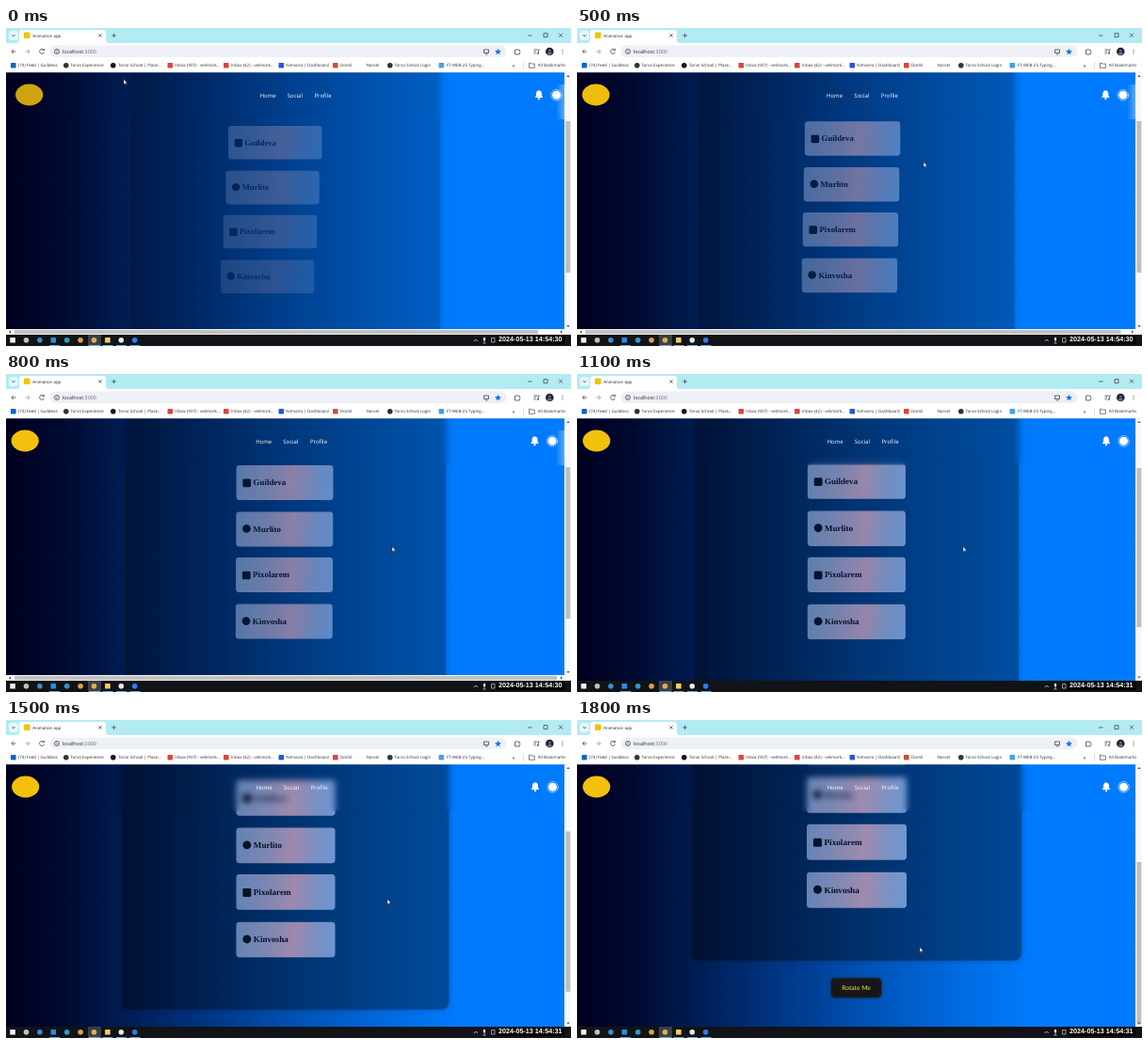
Write an HTML page that moves like this. It is 600 by 338 pixels and loops after 1900 ms.

```html
<!DOCTYPE html>
<html lang="en">
<head>
<meta charset="utf-8">
<title>Animation app</title>
<style>
  html, body { margin: 0; width: 600px; height: 338px; overflow: hidden; }
  body { position: relative; font-family: "Open Sans", sans-serif; text-rendering: geometricPrecision; }
  svg { position: absolute; left: 0; top: 0; overflow: visible; }
  svg text { white-space: pre; }

  #page {
    position: absolute; inset: 0; overflow: hidden;
    background: linear-gradient(90deg, #000020 0, #000a30 60px, #001c52 125px, #00317c 200px,
      #0050b2 300px, #0069de 400px, #007afc 480px, #007bff 600px);
  }
  #panel {
    position: absolute; left: 122px; top: -300px; width: 350px; height: 546px;
    border-radius: 8px;
    background: rgba(0, 0, 0, var(--shade));
    box-shadow: 0 0 5px rgba(0, 0, 0, calc(var(--shade) * .7));
    transform-origin: 175px 300px;
    transform: translateY(calc(var(--top) * 1px)) scale(var(--scale));
  }
  .card {
    position: absolute; left: 122px; top: calc(300px + 50.6px * var(--i));
    width: 106px; height: 38px; border-radius: 3.5px;
    background: linear-gradient(97deg, #6484b6, #8088b2 32%, #a08bae 58%, #7a92c4 80%, #6f98d4);
    color: #06132b; font: bold 9.2px/38px "Liberation Serif", serif;
    opacity: calc(1 - var(--fade) * (1 + .1 * var(--i)));
    transform: translateX(calc(var(--lag) * -1px * (1 + .24 * var(--i))));
  }
  .card i {
    position: absolute; left: 6.5px; top: 14.5px; width: 9px; height: 9px;
    background: #06132b; border-radius: 1.5px;
  }
  .card i.dot { border-radius: 50%; }
  .card span { position: absolute; left: 18.5px; top: 0; }
  #rotate {
    position: absolute; left: 270px; top: 265.2px; width: 53px; height: 20px;
    border-radius: 4px; background: #17171b; color: #f2e53c;
    box-shadow: 0 0 2px 1px rgba(40, 28, 30, .75);
    font: 6.7px/20px Lato, sans-serif; text-align: center;
    transform: translateY(calc(var(--top) * 1px));
  }
  #head {
    position: absolute; left: 0; top: 47px; width: 593px; height: 50px;
    -webkit-backdrop-filter: blur(3px); backdrop-filter: blur(3px);
  }
  #glow {
    position: absolute; left: 584px; top: 60px; width: 9px; height: 37px;
    background: linear-gradient(90deg, rgba(255,255,255,0), rgba(255,255,255,.35));
  }
  #nav { transform: translateX(calc(var(--shift) * 1px)); }
  #cursor { transform: translate(calc(var(--cx) * 1px), calc(var(--cy) * 1px)); }
  .early #late, .late #early, .late #glow { display: none; }
</style>
</head>
<body>
<div id="page">
  <div id="panel">
    <div class="card" style="--i:0"><i></i><span>Guildeva</span></div>
    <div class="card" style="--i:1"><i class="dot"></i><span>Murlito</span></div>
    <div class="card" style="--i:2"><i></i><span>Pixolarem</span></div>
    <div class="card" style="--i:3"><i class="dot"></i><span>Kinvosha</span></div>
  </div>
  <div id="rotate">Rotate Me</div>
  <div id="head"></div>
  <div id="glow"></div>
  <svg width="600" height="338">
    <g id="nav" fill="#fff" font-size="6">
      <ellipse cx="20.7" cy="71" rx="14.6" ry="11.4" fill="#f3c10c" style="opacity:var(--logo)"/>
      <text x="265.7" y="74.2">Home</text>
      <text x="294.8" y="74.2">Social</text>
      <text x="323.5" y="74.2">Profile</text>
      <path d="M562 66.2c-2.2.3-3 1.9-3 4 0 2-.5 2.9-1.5 3.9h9c-1-1-1.5-1.9-1.5-3.9 0-2.100-.8-3.700-3-4z"/>
      <circle cx="562" cy="75.200" r="1.100"/>
      <circle cx="580.500" cy="71.300" r="4.500"/>
      <circle cx="580.500" cy="71.300" r="5.700" fill="none" stroke="#fff" stroke-width=".8" stroke-dasharray="1.500 .6"/>
    </g>
  </svg>
</div>

<svg width="600" height="338">
  <!-- page scrollbars -->
  <rect x="593" y="47" width="7" height="279" fill="#f8f8f8"/>
  <rect id="thumb" x="594.3" width="5" fill="#bfbfbf"/>
  <path d="M595.300 52l1.700-2 1.700 2z" fill="#555"/>
  <path id="late" d="M595.300 321.500l1.700 2 1.700-2z" fill="#555"/>
  <g id="early">
    <rect y="320" width="600" height="6" fill="#f8f8f8"/>
    <rect id="bar" x="9" y="320.900" height="4.300" fill="#c1c1c1"/>
    <path d="M5 321.300l-2 1.700 2 1.700zM589 321.300l2 1.700-2 1.700zM595.300 316l1.700 2 1.700-2z" fill="#555"/>
  </g>

  <!-- tab strip -->
  <rect width="600" height="16" fill="#b3ebf3"/>
  <rect x="3" y="3" width="10" height="10" rx="3" fill="#e3f8fb"/>
  <path d="M11 16q3 0 3-3V5q0-3 3-3h86q3 0 3 3v8q0 3 3 3z" fill="#fff"/>
  <rect x="19" y="4.500" width="6.500" height="6.500" rx="1" fill="#f3c10c"/>
  <text x="28.200" y="9.600" font-size="4.400" fill="#222">Animation app</text>
  <g fill="none" stroke="#333" stroke-width=".7">
    <path d="M6.300 7.300l1.700 1.700 1.700-1.700M98.500 6.300l3.200 3.200m0-3.200l-3.200 3.200M112.300 8h4.600m-2.300-2.300v4.600"/>
    <path d="M554 8h4.500M571 5.700h4v4h-4zM587 5.700l4 4m0-4l-4 4"/>
  </g>

  <!-- toolbar -->
  <rect y="16" width="600" height="31" fill="#fff"/>
  <rect x="46.500" y="18.500" width="485" height="12.500" rx="6.200" fill="#edf0f6"/>
  <g fill="none" stroke="#444" stroke-width=".8">
    <path d="M10.500 25H6m2-2.200L5.800 25 8 27.200"/>
    <path d="M20.300 25h4.500m-2-2.200L25 25l-2.200 2.200" stroke="#999"/>
    <path d="M40 23.300a2.500 2.500 0 1 0 .5 2.300M40.500 22v1.800h-1.800"/>
    <circle cx="54" cy="25" r="2.500"/><path d="M54 24.700v1.600M54 23.300v.6"/>
    <path d="M507.500 23h5v3.500h-5zM509 28h2.500"/>
    <path d="M540.500 23.300h1.500q.7-2 1.600 0h1.700v1.500q2 .8 0 1.700v1.500h-4.800z"/>
    <path d="M560.500 23h4M560.500 25h2.500M560.500 27h2M565.300 27v-4h1.500"/>
    <circle cx="564.700" cy="27" r=".7"/>
  </g>
  <path d="M522.500 21.800l1 2.200 2.400.3-1.800 1.600.5 2.400-2.100-1.200-2.100 1.200.5-2.400-1.800-1.600 2.400-.3z" fill="#1a73e8"/>
  <circle cx="577.300" cy="25" r="4.300" fill="#20233f"/>
  <path d="M575 28.500q0-3 2.300-3t2.300 3z" fill="#7a6b78"/><circle cx="577.300" cy="24" r="1.200" fill="#7a6b78"/>
  <g fill="#444"><circle cx="591" cy="23" r=".6"/><circle cx="591" cy="25" r=".6"/><circle cx="591" cy="27" r=".6"/></g>
  <text x="60" y="26.900" font-size="5.300" fill="#222">localhost<tspan fill="#666">:3000</tspan></text>

  <!-- bookmarks -->
  <g id="marks" font-size="4.450" fill="#2a2a2a">
    <text x="564.800" y="41.300">All Bookmarks</text>
    <text x="537.500" y="41.600" font-size="6">»</text>
  </g>
  <path d="M549.500 36v8" stroke="#bcd" stroke-width=".6"/>
  <path d="M555.500 37.300h2l.8.800h3v4.200h-5.800z" fill="none" stroke="#444" stroke-width=".7"/>
  <path d="M0 47h600" stroke="#dfe3ea" stroke-width=".6"/>

  <!-- taskbar -->
  <rect y="326" width="600" height="12" fill="#121317"/>
  <rect x="87" y="326" width="14" height="12" fill="#3c3f46"/>
  <path d="M46 337.500h11M88 337.500h12M102.500 337.500h11M117 337.500h11M131.500 337.500h11" stroke="#76b9ed" stroke-width=".9"/>
  <g id="apps"></g>
  <path d="M496.800 333l2-2 2 2" fill="none" stroke="#ddd" stroke-width=".8"/>
  <rect x="506.900" y="328.700" width="2.200" height="4" rx="1.100" fill="#eee"/>
  <path d="M508 332.700v2.300M506.500 335h3" stroke="#eee" stroke-width=".6"/>
  <path d="M515.500 329.500h3.500v4.500h-3.500z" fill="none" stroke="#ccc" stroke-width=".7"/>
  <rect x="521.500" y="326" width="72" height="10" fill="#050506"/>
  <text id="clock" x="523" y="333.300" font-family="Liberation Sans, Arial, sans-serif" font-weight="bold" font-size="7.200" fill="#fff"></text>

  <path id="cursor" d="M0-.5v5.400l1.300-1.200.9 1.900.9-.4-.9-1.800h1.700z" fill="#fff" stroke="#111" stroke-width=".45"/>
</svg>

<script>
const $ = id => document.getElementById(id);
const root = document.documentElement;

function add(parent, tag, attrs, text = '') {
  const el = document.createElementNS('http://www.w3.org/2000/svg', tag);
  for (const k in attrs) el.setAttribute(k, attrs[k]);
  el.textContent = text;
  parent.append(el);
}

// icon x, shape, colour, text x, label
[
  [5, 'sq', '#0a66c2', 13, '(74) Feed | Guildeva'],
  [61, 'dot', '#333', 68.3, 'Torvo Experience'],
  [111, 'dot', '#151515', 119, 'Torvo School | Place...'],
  [171.5, 'sq', '#d9473a', 179.3, 'Inbox (907) - velimork...'],
  [231, 'sq', '#d9473a', 239, 'Inbox (42) - velimork...'],
  [289.500, 'sq', '#2458d8', 297.3, 'Nimvoro | Dashboard'],
  [347, 'sq', '#d9473a', 355, 'Domil'],
  [0, '', '', 382.5, 'Norvel'],
  [405, 'dot', '#333', 412.3, 'Torvo School Login'],
  [459.5, 'sq', '#3fa2ee', 468, 'FT-WEB-25 Typing...']
].forEach(([x, kind, fill, tx, label]) => {
  if (kind) add($('marks'), 'rect', { x, y: 37, width: 5.6, height: 5.6, rx: kind === 'dot' ? 2.8 : .8, fill });
  add($('marks'), 'text', { x: tx, y: 41.3 }, label);
});

['#f2f2f2', '#b9c8b4', '#3c8fd0', '#2a8ee0', '#2f9bc9', '#d9a441', '#e0b04a', '#f3cf62', '#e8e8e8', '#2d7ff0']
  .forEach((fill, n) => add($('apps'), 'rect', {
    x: 4.3 + n * 14.4, y: 329, width: 5.6, height: 5.6, rx: [0, 3, 7].includes(n) ? .4 : 2.8, fill
  }));

const LOOP = 1900, STEP = 100, SWITCH = 1000;
const times = [0, 300, 600, 800, 1100, 1300, 1500, 1800];
const tracks = {
  top:   [104, 101.4, 98.2, 97, 95.5, 94.8, 64, 9.8],
  scale: [.937, .948, .962, .971, .982, .987, .991, 1],
  lag:   [12, 7.6, 3.1, 1, .1, 0, 0, 0],
  fade:  [.56, .38, .2, .12, .05, .03, .01, 0],
  shade: [.2, .23, .27, .3, .35, .37, .38, .4],
  shift: [4, 0, -1, -.5, 0, 0, 0, 0],
  logo:  [.85, .95, 1, 1, 1, 1, 1, 1],
  cx:    [125, 368, 368, 410, 410, 410, 405, 364],
  cy:    [55, 143, 143, 184, 184, 184, 191, 242]
};

function sample(list, t) {
  let i = 0;
  while (i < times.length - 2 && t >= times[i + 1]) i++;
  const k = Math.min(1, (t - times[i]) / (times[i + 1] - times[i]));
  return list[i] + (list[i + 1] - list[i]) * k;
}

function draw(now) {
  const t = Math.floor(now % LOOP / STEP) * STEP;
  for (const name in tracks) root.style.setProperty('--' + name, sample(tracks[name], t).toFixed(4));

  const late = t >= SWITCH;
  document.body.className = late ? 'late' : 'early';
  $('clock').textContent = '2024-05-13 14:54:' + (late ? 31 : 30);
  $('bar').setAttribute('width', 556 + t / 40);

  const scrolled = Math.max(0, 94.8 - sample(tracks.top, t));
  $('thumb').setAttribute('y', (late ? 100 : 99) + scrolled * .6);
  $('thumb').setAttribute('height', late ? 169 + scrolled * .04 : 161);
}

const start = performance.now();
function tick() {
  draw(performance.now() - start);
  requestAnimationFrame(tick);
}
tick();
</script>
</body>
</html>
```
